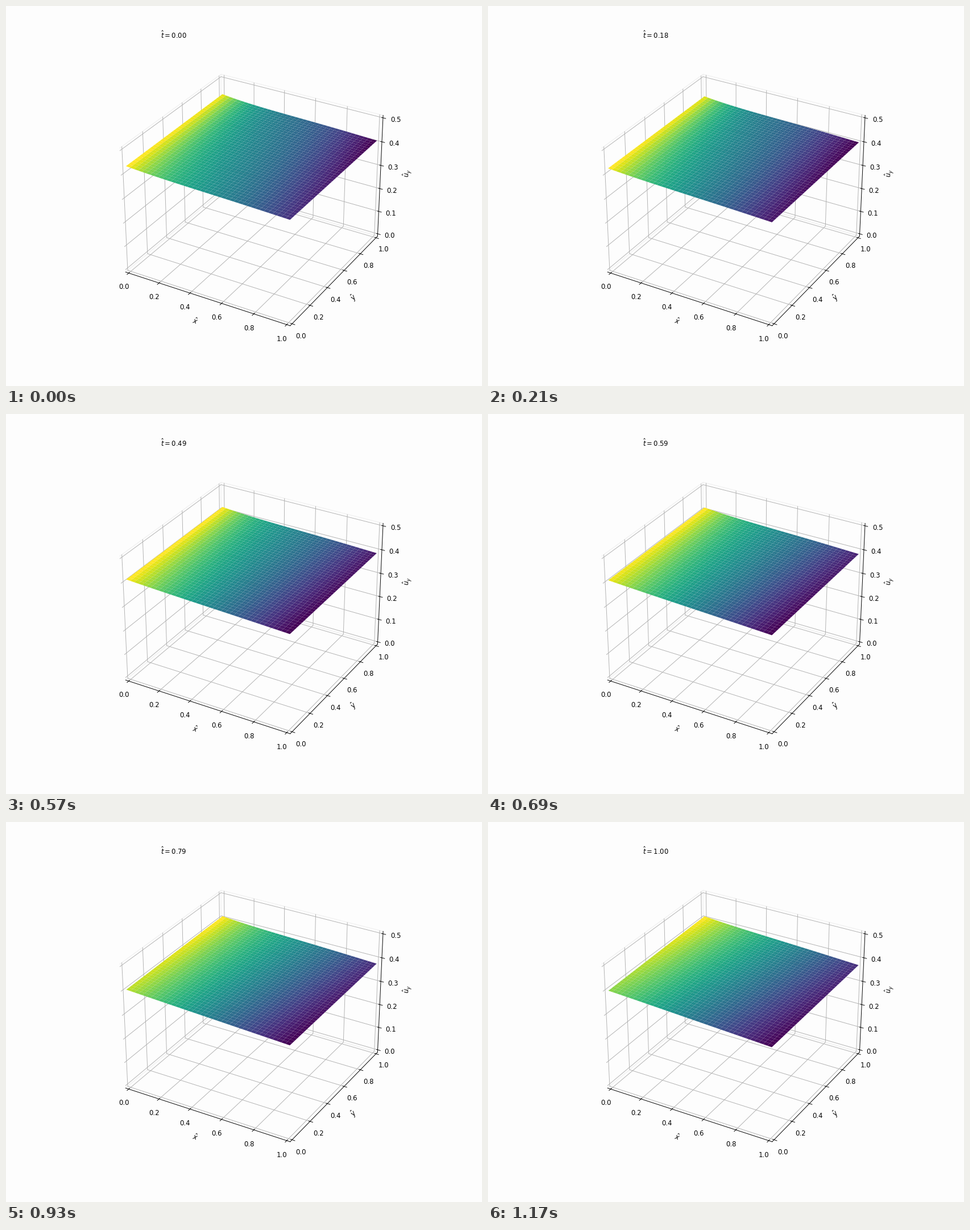
A matplotlib script that plays this animation: 837 px wide and 669 px high, repeating every 1.2 s.

```python
import numpy as np
import matplotlib.pyplot as plt
from matplotlib.animation import FuncAnimation

WIDTH, HEIGHT, DPI = 837, 669, 83.7
FRAMES, INTERVAL = 40, 30
EPS = 1e-6  # keeps the pixel size from rounding down
PAPER = "#fdfdfd"

x, y = np.meshgrid(np.linspace(0, 1, 40), np.linspace(0, 1, 40))


def quad(t, a, b, c):
    return a + b * t + c * t * t


def height(t):
    """Sheet height at time t: four sinking corners plus a bow along x."""
    z00 = quad(t, 0.4347, -0.0528, 0.0180)
    z01 = quad(t, 0.4341, -0.0576, 0.0310)
    z10 = quad(t, 0.4116, -0.0561, 0.0110)
    z11 = quad(t, 0.4078, -0.0428, 0.0069)
    near = z00 + (z10 - z00) * x
    far = z01 + (z11 - z01) * x
    bow = 0.027 * (1 - 1.2 * t + y) * x * (1 - x) ** 3
    return near + (far - near) * y - bow


fig = plt.figure(figsize=((WIDTH + EPS) / DPI, (HEIGHT + EPS) / DPI),
                 dpi=DPI, facecolor=PAPER)
ax = fig.add_subplot(projection="3d", facecolor=PAPER)
ax.view_init(elev=30, azim=-60)

margin = 1 / 48
ax.set_xlim(-margin, 1 + margin)
ax.set_ylim(-margin, 1 + margin)
ax.set_zlim(-margin / 2, 0.5 + margin / 2)
for axis in (ax.xaxis, ax.yaxis, ax.zaxis):
    axis.pane.set_fill(False)
    axis.pane.set_alpha(1)
    axis.pane.set_edgecolor("#f0f0f0")
ax.set_xticks(np.arange(6) / 5)
ax.set_yticks(np.arange(6) / 5)
ax.set_zticks(np.arange(6) / 10)
ax.set_xlabel(r"$\hat{x}$")
ax.set_ylabel(r"$\hat{y}$")
ax.set_zlabel(r"$\hat{u}_y$")

clock = fig.text(295 / WIDTH, 1 - 57 / HEIGHT, "", ha="center", va="baseline")
sheets = []


def draw(i):
    t = i / (FRAMES - 1)
    while sheets:
        sheets.pop().remove()
    sheets.append(ax.plot_surface(x, y, height(t), cmap="viridis",
                                  rstride=1, cstride=1))
    clock.set_text(rf"$\hat{{t}}={t:.2f}$")
    return sheets + [clock]


anim = FuncAnimation(fig, draw, frames=FRAMES, interval=INTERVAL,
                     init_func=lambda: draw(0), repeat=True, repeat_delay=0)
plt.show()
```
